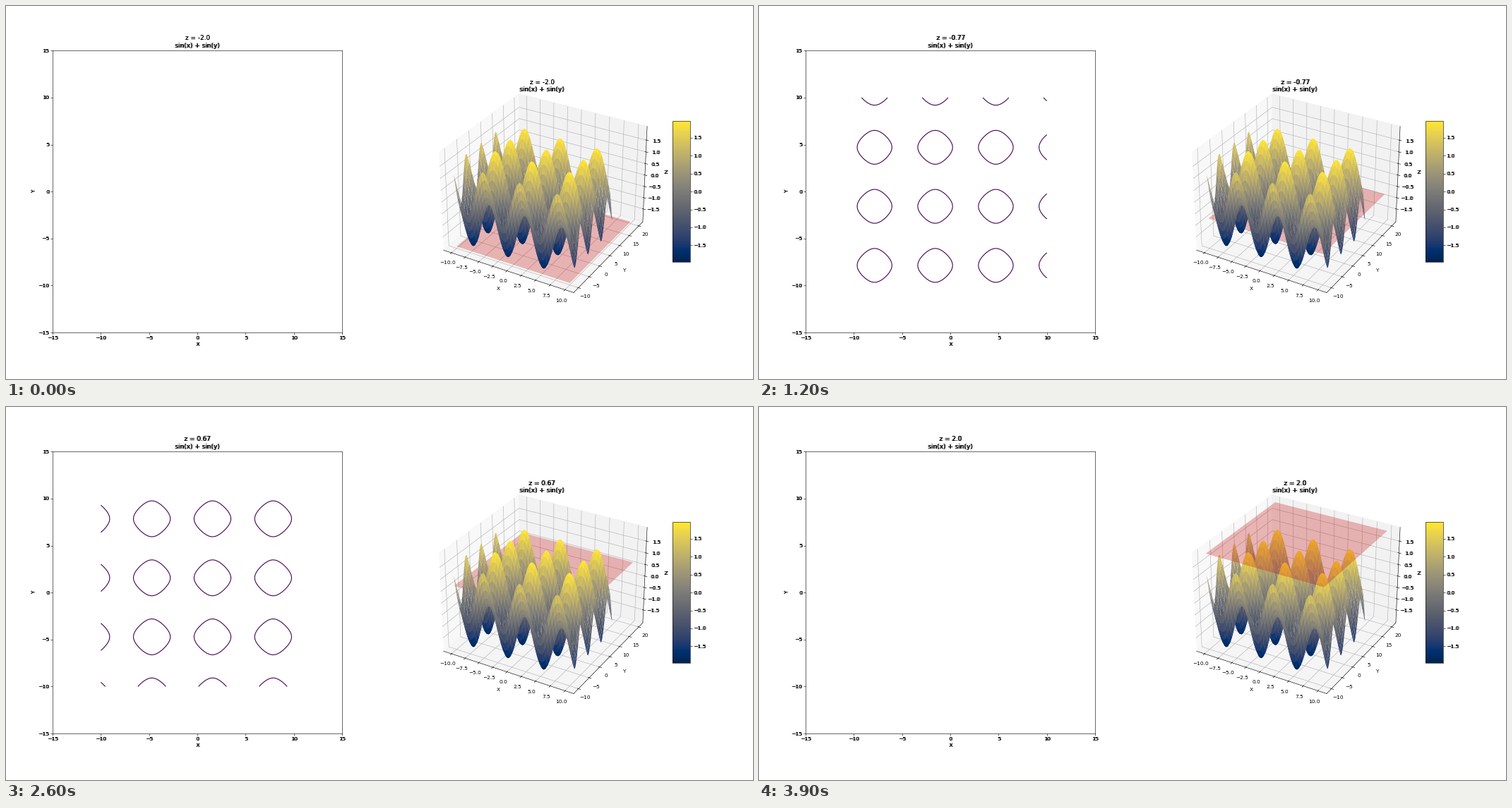
Write a matplotlib script that moves like this. It is 1058 by 529 pixels and loops after 4 s.

```python
import numpy as np
import matplotlib.pyplot as plt
from matplotlib.animation import FuncAnimation
from matplotlib.transforms import Affine2D

WIDTH, HEIGHT, DPI = 1058, 529, 52.9
FRAMES, INTERVAL = 40, 100
LEVELS = np.linspace(-2, 2, FRAMES)
PAD = 25 / 24  # room between the data limits and the walls of the 3D box

plt.rcParams["font.family"] = "DejaVu Sans"
fig = plt.figure(figsize=(WIDTH / DPI, HEIGHT / DPI), dpi=DPI)


def place(left, top, width, height, **kwargs):
    """Add axes given in pixels from the top left corner."""
    box = [left / WIDTH, 1 - (top + height) / HEIGHT, width / WIDTH, height / HEIGHT]
    return fig.add_axes(box, **kwargs)


def thicken(text):
    """Draw a text twice, one pixel apart."""
    draw_once = text.draw

    def draw_twice(renderer):
        base = text.get_transform()
        draw_once(renderer)
        text.set_transform(base + Affine2D().translate(1, 0))
        draw_once(renderer)
        text.set_transform(base)

    text.draw = draw_twice


def thicken_axis(axis):
    thicken(axis.label)
    for tick in axis.get_major_ticks():
        thicken(tick.label1)
        thicken(tick.label2)


x = np.linspace(-10, 10, 100)
X, Y = np.meshgrid(x, x)
Z = np.sin(X) + np.sin(Y)
plane_x, plane_y = np.meshgrid([-10, 10], [-10, 20])
z_ticks = np.arange(-1.5, 1.6, 0.5)

# Contour view
flat = place(66, 63.3, 410, 399.8)
flat.set(xlabel="X", ylabel="Y",
         xticks=np.arange(-15, 16, 5), yticks=np.arange(-15, 16, 5),
         xlim=(-15, 15), ylim=(-15, 15))

# Surface view
solid = place(595, 99.2, 328, 328, projection="3d")
surface = solid.plot_surface(X, Y, Z, cmap="cividis")
solid.set(xlabel="X", ylabel="Y", zlabel="Z",
          xticks=np.arange(-10, 10.1, 2.5), yticks=np.arange(-10, 21, 5),
          zticks=z_ticks)
solid.set_xlim(-11 * PAD, 11 * PAD, view_margin=0)
solid.set_ylim(5 - 16.5 * PAD, 5 + 16.5 * PAD, view_margin=0)
solid.set_zlim(-2 * PAD, 2 * PAD, view_margin=0)

bar_axes = place(943.5, 163.2, 25, 200)
fig.colorbar(surface, cax=bar_axes, ticks=z_ticks)

for axis in (flat.xaxis, flat.yaxis, solid.zaxis, bar_axes.yaxis):
    thicken_axis(axis)
for axes in (flat, solid):
    thicken(axes.title)

moving = []


def update(frame):
    while moving:
        moving.pop().remove()
    z = float(LEVELS[frame])
    for axes in (flat, solid):
        axes.set_title(f"z = {round(z, 2)}\nsin(x) + sin(y)", y=1.0)
    if Z.min() < z < Z.max():
        moving.append(flat.contour(X, Y, Z, levels=[z], cmap="viridis"))
    moving.append(solid.plot_surface(plane_x, plane_y, np.full((2, 2), z),
                                     color="red", alpha=0.27))
    return []


animation = FuncAnimation(fig, update, frames=FRAMES, interval=INTERVAL,
                          init_func=lambda: [], repeat=True, repeat_delay=0)
plt.show()
```
